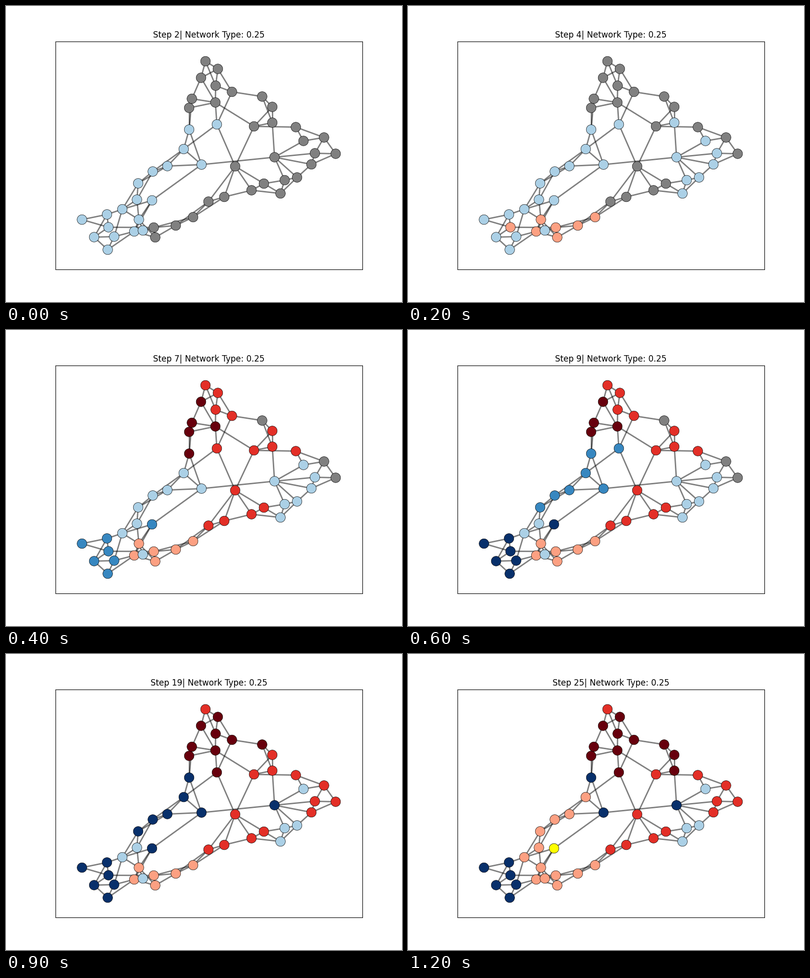
Recreate the animation shown at these times as a matplotlib script. Size 800x600 px, loop 1.3 s.

```python
import matplotlib.pyplot as plt
import numpy as np
from matplotlib.animation import FuncAnimation
from matplotlib.collections import LineCollection

# Node positions in stage pixels, in ring order
POS = np.array([
    (153.5, 433), (204, 422.5), (207, 448.5), (178, 468.5), (205.5, 494),
    (218.5, 467.5), (259, 457), (295, 394), (268.5, 433), (235, 412),
    (264.5, 392.5), (267, 359.5), (296.5, 335.5), (326, 324.5), (359, 290),
    (395, 321.5), (370, 250.5), (370, 206.5), (375.5, 188), (423, 195.5),
    (394, 145.5), (403, 112), (428, 127.5), (423.5, 161.5), (456.5, 174),
    (517.5, 183.5), (538, 204.5), (538, 236.5), (501, 244), (585.5, 245.5),
    (601, 273.5), (642.5, 266.5), (666, 299.5), (624, 298.5), (617, 321),
    (542.5, 306.5), (588, 347.5), (563, 353), (554.5, 380), (521, 360),
    (496, 373.5), (463, 325), (441, 387), (409, 396.5), (378, 428),
    (343, 445), (298.5, 449), (301.5, 469), (276.5, 455), (426, 240),
])
N = len(POS)

# Small-world graph: ring lattice with some links rewired
CUT = {(23, 25), (24, 26), (27, 29), (28, 30), (30, 32), (47, 49), (48, 49),
       (48, 0), (49, 0), (49, 1), (2, 4), (5, 7), (15, 17), (19, 21), (47, 48)}
SHORTCUTS = [(1, 9), (2, 46), (5, 9), (7, 15), (15, 35), (14, 49), (49, 19),
             (49, 24), (49, 41), (23, 19), (27, 35), (28, 19), (28, 41),
             (30, 35), (48, 8), (47, 6), (47, 8)]
ring = [(i, (i + d) % N) for i in range(N) for d in (1, 2)]
EDGES = [e for e in ring if e not in CUT] + SHORTCUTS


def span(a, b):
    return list(range(a, b + 1))


MARK = 9  # highlighted node

# (step number, [(opinion, nodes), ...]); negative is blue, positive is red
STEPS = [
    (2, [(-1, span(0, 16) + [48, 49])]),
    (3, [(1, [2, 6, 8] + span(44, 47))]),
    (4, [(-1, [27, 30] + span(33, 38))]),
    (5, [(2, span(20, 24) + [49]), (1, span(17, 19) + [28])]),
    (7, [(3, span(16, 20)), (2, span(26, 29) + span(39, 43)),
         (-2, span(0, 5) + [7])]),
    (8, [(-3, span(0, 5) + [7])]),
    (9, [(-2, span(11, 16) + [49])]),
    (11, [(2, span(31, 35))]),
    (14, [(-3, span(11, 16) + [35])]),
    (19, [(3, span(22, 25) + [49])]),
    (23, [(3, [26, 27])]),
    (24, [(1, span(9, 12) + [48])]),
    (25, [(1, [13, 14]), (MARK, [7])]),
]


def color(v):
    if v == MARK:
        return (1, 1, 0, 1)
    if v == 0:
        return (0.5, 0.5, 0.5, 1)
    cmap = plt.cm.Reds if v > 0 else plt.cm.Blues
    return cmap(abs(v) / 3)


def opinions(k):
    state = np.zeros(N, int)
    for _, changes in STEPS[:k + 1]:
        for value, nodes in changes:
            state[nodes] = value
    return state


fig, ax = plt.subplots(figsize=(8, 6), dpi=100)
ax.set(xlim=(100, 720), ylim=(534, 72), xticks=[], yticks=[])
ax.add_collection(LineCollection([POS[list(e)] for e in EDGES],
                                 colors="black", linewidths=2, alpha=0.5,
                                 zorder=1))
dots = ax.scatter(*POS.T, s=200, edgecolors="black", linewidths=0.5, zorder=2)
title = ax.set_title("")


def update(k):
    dots.set_facecolor([color(v) for v in opinions(k)])
    title.set_text(f"Step {STEPS[k][0]}| Network Type: 0.25")
    return dots, title


anim = FuncAnimation(fig, update, frames=len(STEPS), interval=100, repeat=True,
                     repeat_delay=0, blit=False)
plt.show()
```
